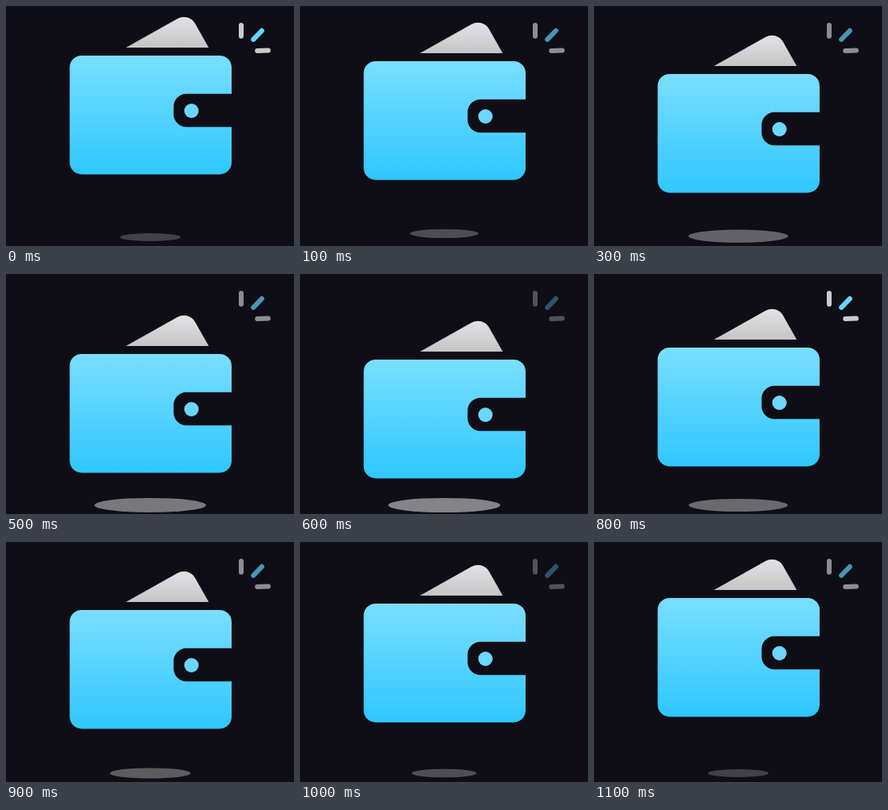
Animation, 360 px wide and 300 px high, one loop 1.2 s. Source, as an HTML page with a canvas:

```html
<!DOCTYPE html>
<html lang="en">
<head>
<meta charset="utf-8">
<title>Wallet</title>
<style>
html, body { margin: 0; width: 100%; height: 100%; overflow: hidden; background: #0f0e16; }
canvas { display: block; width: 360px; height: 300px; }
</style>
</head>
<body>
<canvas id="stage" width="360" height="300"></canvas>
<script>
const ctx = document.getElementById('stage').getContext('2d');
const BG = '#0f0e16';
const LOOP = 1200, HALF = LOOP / 2, STEP = 100;

const clamp = v => Math.min(1, Math.max(0, v));
const easeInOut = v => (1 - Math.cos(Math.PI * clamp(v))) / 2;
const triangle = (t, period) => Math.abs(1 - 2 * (t % period) / period);

function fade(y0, y1, top, bottom) {
  const g = ctx.createLinearGradient(0, y0, 0, y1);
  g.addColorStop(0, top);
  g.addColorStop(1, bottom);
  return g;
}

function fillRound(x, y, w, h, radii, color) {
  ctx.fillStyle = color;
  ctx.beginPath();
  ctx.roundRect(x, y, w, h, radii);
  ctx.fill();
}

function stroke(x0, y0, x1, y1, color) {
  ctx.strokeStyle = color;
  ctx.beginPath();
  ctx.moveTo(x0, y0);
  ctx.lineTo(x1, y1);
  ctx.stroke();
}

// Grows quickly while settling down, then shrinks a little before the wallet is back up
function drawShadow(t) {
  const growing = t < HALF;
  const size = growing
    ? easeInOut(1 - (1 - t / HALF) ** 1.6)
    : 1 - easeInOut((t - 660) / 420);
  const light = growing ? t / HALF : clamp((1100 - t) / 500);
  const rx = 38 + 32 * size;
  const y = growing ? 289 - 5.3 * (1 - size) : 289;
  const grey = Math.round(66 + 66 * light);

  ctx.fillStyle = `rgb(${grey},${grey - 1},${grey + 4})`;
  ctx.beginPath();
  ctx.ellipse(180.3, y, rx, rx * 0.13, 0, 0, Math.PI * 2);
  ctx.fill();
}

function drawWallet(dy) {
  ctx.save();
  ctx.translate(0, dy);

  ctx.fillStyle = fade(13, 52, '#e3e2e5', '#c5c5c6');
  ctx.beginPath();
  ctx.moveTo(150, 52);
  ctx.arcTo(228.4, 8, 253.4, 52, 16);
  ctx.lineTo(253.4, 52);
  ctx.fill();

  fillRound(79.6, 61.9, 202.4, 148.5, 15, fade(62, 210, '#7adeff', '#2fc7ff'));
  fillRound(209.5, 109.8, 73.5, 41.4, [16, 0, 0, 16], BG);

  ctx.fillStyle = '#6bd7ff';
  ctx.beginPath();
  ctx.arc(231.8, 131, 9, 0, Math.PI * 2);
  ctx.fill();
  ctx.restore();
}

function drawSparks(alpha) {
  ctx.save();
  ctx.globalAlpha = alpha;
  ctx.lineWidth = 6;
  ctx.lineCap = 'round';
  stroke(294, 24, 294, 37.7, '#cccacb');
  stroke(309.2, 41.8, 319.8, 30.8, '#66d6ff');
  stroke(314.2, 56, 327.8, 55.5, '#cccacb');
  ctx.restore();
}

function draw(now) {
  // The loop's first step shows its end pose, so time runs from one step to LOOP
  const t = Math.floor((now % LOOP) / STEP) * STEP || LOOP;
  ctx.fillStyle = BG;
  ctx.fillRect(0, 0, 360, 300);
  drawShadow(t);
  drawWallet(Math.round(45 * (1 - triangle(t, LOOP))));
  drawSparks(0.36 + 0.64 * triangle(t, 400));
}

const start = performance.now();
function tick() {
  draw(performance.now() - start);
  requestAnimationFrame(tick);
}
tick();
</script>
</body>
</html>
```
